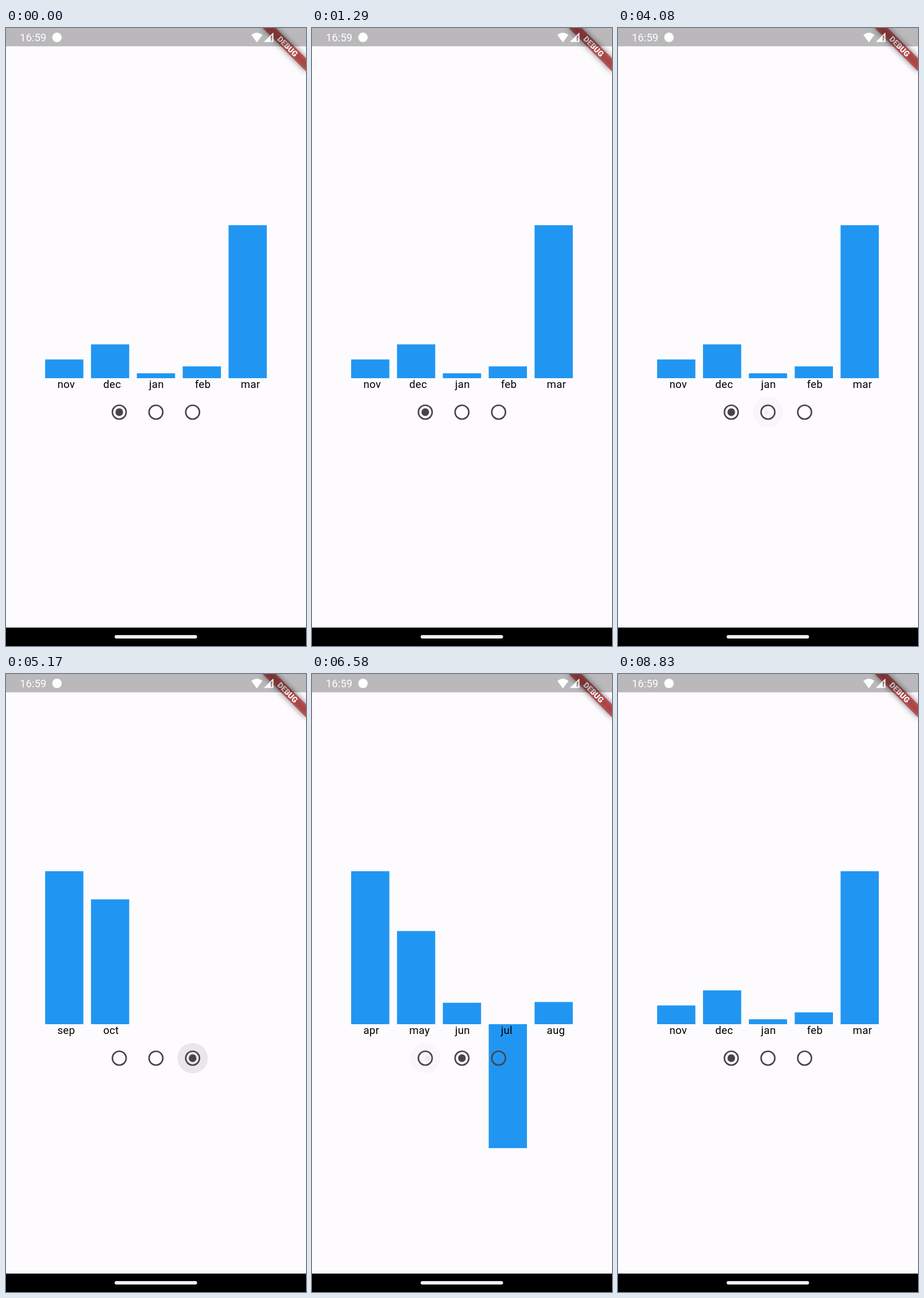
Animation of 522 by 1073 pixels, one loop 8.87 s. Source, as an HTML page:

```html
<!DOCTYPE html>
<html lang="en">
<head>
<meta charset="utf-8">
<title>Monthly bar chart</title>
<style>
  html, body { margin: 0; width: 100%; height: 100%; overflow: hidden; background: #fdfbfe; }
  svg { display: block; width: 522px; height: 1073px; }
  text { font-family: Roboto, sans-serif; font-size: 18.6px; }
  .bar { fill: #2096f2; }
  .ring { fill: none; stroke: #46434c; stroke-width: 2.66; }
  .dot { fill: #46434c; }
  .ink { fill: #49454f; }
  .banner { font-size: 13.55px; font-weight: 900; fill: #fff; text-anchor: middle; }
</style>
</head>
<body>
<svg viewBox="0 0 522 1073" xmlns="http://www.w3.org/2000/svg">
  <defs>
    <filter id="shadow" x="-50%" y="-200%" width="200%" height="500%">
      <feGaussianBlur stdDeviation="5.2"/>
    </filter>
    <clipPath id="buttonClip"><circle r="26.6"/></clipPath>
  </defs>
  <rect width="522" height="1073" fill="#fdfbfe"/>

  <g id="charts"></g>
  <g id="buttons"></g>

  <g transform="translate(522 0) rotate(45)">
    <rect x="-53.2" y="37.2" width="106.4" height="16" opacity=".5" filter="url(#shadow)"/>
    <rect x="-53.2" y="37.2" width="106.4" height="16" fill="#b71c1c" fill-opacity=".627"/>
    <text class="banner" y="50">DEBUG</text>
  </g>

  <rect width="522" height="31.8" fill-opacity=".265"/>
  <g fill="#fff">
    <text x="24" y="23.2">16:59</text>
    <circle cx="88.7" cy="16.3" r="8.3"/>
    <path d="M436.5 25 L426.8 12 Q436.5 4.4 446.2 12 Z"/>
    <path fill-rule="evenodd" d="M448.6 24.3 L465.3 7.8 V24.3 Z M460.3 15 V22.4 H463.3 V12 Z"/>
  </g>

  <rect y="1041" width="522" height="32"/>
  <rect x="189" y="1054" width="143.5" height="6" rx="3" fill="#f1edf1"/>
</svg>

<script>
const LOOP = 8870, HOLD = 100, BASE = 608, RADIUS = 26.6;

// Each entry: month label and signed bar height.
const pages = [
  [["nov", 32.5], ["dec", 58.7], ["jan", 8.5], ["feb", 20.5], ["mar", 265.6]],
  [["apr", 265.6], ["may", 161.7], ["jun", 37.2], ["jul", -215.2], ["aug", 38.5]],
  [["sep", 265.6], ["oct", 216.7]],
];

// Press time, button index and horizontal offset of the touch point.
const taps = [
  { at: 4045, button: 1, dx: -3 },
  { at: 4890, button: 2, dx: -3 },
  { at: 5720, button: 1, dx: 3 },
  { at: 6535, button: 0, dx: 5 },
];

const clamp = v => Math.max(0, Math.min(1, v));

function add(parent, tag, attrs = {}, content = "") {
  const el = document.createElementNS("http://www.w3.org/2000/svg", tag);
  for (const [key, value] of Object.entries(attrs)) el.setAttribute(key, value);
  el.textContent = content;
  return parent.appendChild(el);
}

const charts = pages.map(page => {
  const group = add(document.getElementById("charts"), "g");
  page.forEach(([month, height], i) => {
    const x = 68.1 + i * 79.8;
    add(group, "rect", {
      class: "bar", x, y: BASE - Math.max(height, 0), width: 66.5, height: Math.abs(height),
    });
    add(group, "text", { x: x + 21.3, y: 625.4, "letter-spacing": .3 }, month);
  });
  return group;
});

const buttons = pages.map((_, i) => {
  const group = add(document.getElementById("buttons"), "g", {
    transform: `translate(${197.1 + i * 63.8} 667)`,
  });
  const highlight = add(group, "circle", { class: "ink", r: RADIUS });
  const clip = add(group, "g", { "clip-path": "url(#buttonClip)" });
  const splash = add(clip, "circle", { class: "ink" });
  add(group, "circle", { class: "ring", r: 11.96 });
  const dot = add(group, "circle", { class: "dot", r: 6.65 });
  return { highlight, splash, dot };
});

function drawInk({ highlight, splash }, tap, now) {
  const age = tap ? now - tap.at : 1e4;
  const glow = clamp((age < HOLD ? age : 2 * HOLD - age) / 200);
  const grow = clamp(age / 240);
  const alpha = Math.min(clamp(age / 80), clamp((617 - age) / 370));
  highlight.setAttribute("opacity", .12 * glow);
  splash.setAttribute("opacity", .12 * alpha);
  splash.setAttribute("r", RADIUS * grow);
  splash.setAttribute("cx", tap ? tap.dx * (1 - grow) : 0);
}

function draw() {
  const now = performance.now() % LOOP;
  const chosen = taps.filter(tap => now >= tap.at + HOLD).pop();
  const selected = chosen ? chosen.button : 0;
  charts.forEach((chart, i) => chart.setAttribute("visibility", i === selected ? "visible" : "hidden"));
  buttons.forEach((button, i) => {
    button.dot.setAttribute("visibility", i === selected ? "visible" : "hidden");
    drawInk(button, taps.filter(tap => tap.button === i && now >= tap.at).pop(), now);
  });
  requestAnimationFrame(draw);
}
draw();
</script>
</body>
</html>
```
